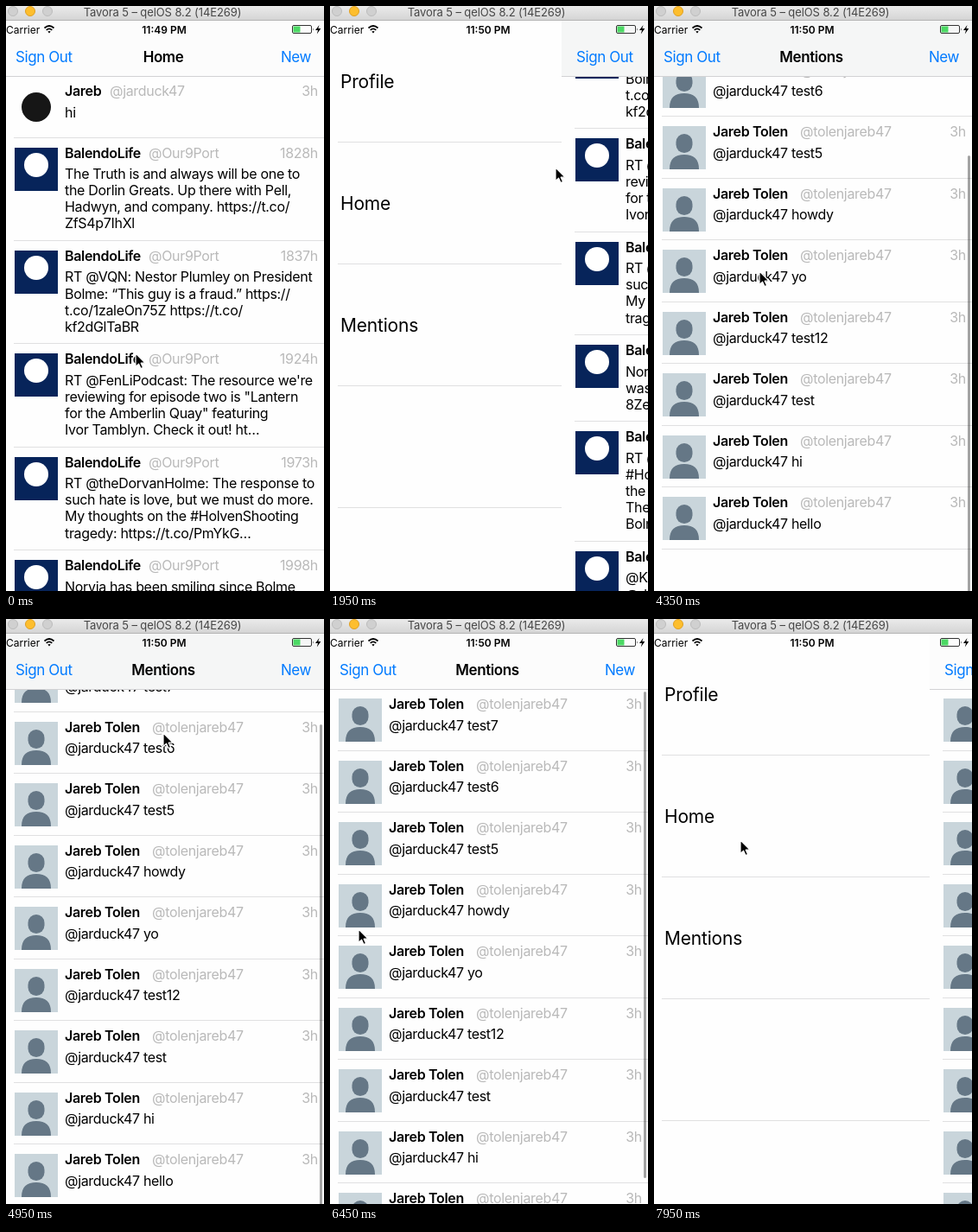
Animation, 368 px wide and 677 px high, one loop 8 s. Source, as an HTML page:

```html
<!DOCTYPE html>
<html lang="en">
<head>
<meta charset="utf-8">
<title>Timeline app</title>
<style>
html, body { margin: 0; width: 100%; height: 100%; overflow: hidden; background: #fefefe; }
svg { display: block; width: 368px; height: 677px; font-family: Inter, "Liberation Sans", sans-serif; }
text { white-space: pre; }
.body { font-size: 16px; letter-spacing: -.32px; }
.name { font-weight: 600; }
.soft { fill: #b9b9b9; }
.nav { font-size: 17px; letter-spacing: -.41px; }
.link { fill: #007aff; }
.title { font-weight: 600; }
.menu { font-size: 21px; letter-spacing: -.2px; }
.status { font-size: 12px; }
.bar { font-size: 13px; letter-spacing: -.1px; fill: #464646; }
.end { text-anchor: end; }
.mid { text-anchor: middle; }
</style>
</head>
<body>
<svg id="stage" viewBox="0 0 368 677">
  <defs>
    <linearGradient id="chrome" x2="0" y2="1">
      <stop stop-color="#ebebeb"/><stop offset="1" stop-color="#d3d3d3"/>
    </linearGradient>
    <clipPath id="face"><rect width="50" height="50"/></clipPath>
    <g id="person" clip-path="url(#face)">
      <rect width="50" height="50" fill="#c9d5db"/>
      <rect x="15.500" y="9" width="19" height="22" rx="9.500" fill="#657786"/>
      <path d="M8 50C8 38 14 33 25 33S42 38 42 50Z" fill="#657786"/>
    </g>
    <g id="club">
      <rect width="50" height="50" fill="#07245a"/>
      <circle cx="25" cy="20" r="14" fill="#fff"/>
    </g>
    <circle id="dot" cx="25" cy="25" r="17" fill="#161616"/>
  </defs>
  <rect width="368" height="677" fill="#fefefe"/>
  <g id="menu"></g>
  <g id="panel">
    <rect x="-6" y="17" width="375" height="660" fill="#fefefe"/>
    <g id="home"></g>
    <g id="mentions"></g>
    <g id="blank"></g>
    <rect id="thumb" x="363" width="3" rx="1.500"/>
    <rect id="navBack" x="-6" y="17" width="375" height="64"/>
    <rect x="-6" y="81" width="375" height="1" fill="#d2d2d4"/>
    <text id="signOut" class="nav link" y="65">Sign Out</text>
    <text id="navTitle" class="nav title mid" x="182" y="65"></text>
    <text class="nav link end" x="353" y="65">New</text>
  </g>
  <g id="status">
    <text class="status" x="0" y="31.500">Carrier</text>
    <g fill="none" stroke="#000" stroke-width="1.700">
      <path d="M44.500 25.500Q50 20.500 55.500 25.500M46.700 27.900Q50 25 53.300 27.900"/>
      <path d="M50 31.500L48.300 29.600Q50 28.300 51.700 29.600Z" fill="#000" stroke="none"/>
    </g>
    <text id="clock" class="status title mid" x="183" y="31.500"></text>
    <rect x="331.500" y="22.500" width="22" height="9" rx="1.500" fill="none" stroke="#333"/>
    <rect x="332.500" y="23.500" width="8" height="7" fill="#4cd964"/>
    <path d="M355 25.500q1.500 1.500 0 3z" fill="#333"/>
    <path d="M362.500 22L358 28h3l-1.200 4.500L364.300 26h-3z"/>
  </g>
  <g id="chromeBar">
    <rect width="368" height="17" fill="url(#chrome)"/>
    <rect y="16" width="368" height="1" fill="#b4b4b4"/>
    <g fill="#d0d0d0" stroke="#bcbcbc">
      <circle cx="8" cy="6" r="5.500"/>
      <circle cx="28" cy="6" r="5.500" fill="#fdbe2e" stroke="#dfa023"/>
      <circle cx="48" cy="6" r="5.500"/>
    </g>
    <text class="bar mid" x="181" y="12">Tavora 5 – qelOS 8.2 (14E269)</text>
  </g>
  <path id="cursor" d="M0 0V15.500L3.600 12.200L6 17.600L8.600 16.500L6.200 11.200H11Z"
    stroke="#fff" stroke-width="1.200" stroke-linejoin="round"/>
</svg>
<script>
const $ = id => document.getElementById(id);
const LOOP = 8000, STEP = 150, TOP = 81.5, OPEN = 325;

function add(parent, tag, attrs, text) {
  const el = document.createElementNS("http://www.w3.org/2000/svg", tag);
  for (const key in attrs) el.setAttribute(key, attrs[key]);
  if (text) el.textContent = text;
  parent.appendChild(el);
  return el;
}
const line = (parent, x, y) =>
  add(parent, "rect", { x, y, width: 375 - x, height: 1, fill: "#e0e0e1" });

function addRows(list, rows) {
  let top = TOP;
  for (const { icon, name, handle, handleX, age, lines } of rows) {
    const y = top + 22.5;
    add(list, "use", { href: "#" + icon, x: 10, y: Math.round(top + 10.5) });
    add(list, "text", { class: "body name", x: 68, y }, name);
    add(list, "text", { class: "body soft", x: handleX, y }, handle);
    add(list, "text", { class: "body soft end", x: 361, y }, age);
    lines.forEach((s, i) =>
      add(list, "text", { class: "body", x: 68, y: top + 47 + i * 19.1 }, s));
    top += Math.max(71.5, 43 + 19.1 * lines.length);
    line(list, 9, Math.floor(top) - 1);
  }
}

const post = (age, ...lines) => ({
  icon: "club", name: "BalendoLife", handle: "@Our9Port", handleX: 165, age, lines
});
addRows($("home"), [
  { icon: "dot", name: "Jareb", handle: "@jarduck47", handleX: 120, age: "3h", lines: ["hi"] },
  post("1828h", "The Truth is and always will be one to", "the Dorlin Greats. Up there with Pell,",
    "Hadwyn, and company. https://t.co/", "ZfS4p7IhXl"),
  post("1837h", "RT @VQN: Nestor Plumley on President", "Bolme: “This guy is a fraud.” https://",
    "t.co/1zaleOn75Z https://t.co/", "kf2dGlTaBR"),
  post("1924h", "RT @FenLiPodcast: The resource we're", "reviewing for episode two is \"Lantern",
    "for the Amberlin Quay\" featuring", "Ivor Tamblyn. Check it out! ht…"),
  post("1973h", "RT @theDorvanHolme: The response to", "such hate is love, but we must do more.",
    "My thoughts on the #HolvenShooting", "tragedy: https://t.co/PmYkG…"),
  post("1998h", "Norvia has been smiling since Bolme", "was placed into power. https://t.co/",
    "8ZehlvdbPK"),
  post("1998h", "RT @pillo38: Joss Tarvey said that the", "#HolvenCityChapelShooting justifies",
    "the #MarketBan.", "The shooter was a white supremacist,", "Bolme supp…"),
  post("2000h", "@KV31_ @CordeliaFenn @zwpolitics", "@dorwen We are not convinced,", "so far.")
]);
addRows($("mentions"), ["test7", "test6", "test5", "howdy", "yo", "test12", "test", "hi", "hello"]
  .map(word => ({
    icon: "person", name: "Jareb Tolen", handle: "@tolenjareb47", handleX: 169,
    age: "3h", lines: ["@jarduck47 " + word]
  })));
for (let y = 109; y < 677; y += 44) line($("blank"), 9, y);

const glow = add($("menu"), "rect", { y: 299, width: 368, height: 140, fill: "#d9d9d9" });
["Profile", "Home", "Mentions", ""].forEach((label, i) => {
  add($("menu"), "text", { class: "menu", x: 12, y: 95 + 141 * i }, label);
  line($("menu"), 9, 157 + 141 * i);
});

// Progress from 0 to 1 between two times, plain and eased.
const span = (t, from, to) => Math.min(1, Math.max(0, (t - from) / (to - from)));
const ease = (t, from, to) => {
  const p = span(t, from, to);
  return p * p * (3 - 2 * p);
};

const slide = t =>
  OPEN * (ease(t, 1500, 2100) - ease(t, 2850, 3780) + ease(t, 6800, 7550));

const homeScroll = t => 249 * ease(t, 0, 1050);

// Pull past the end, spring back, then pull down past the top.
const mentionScroll = t =>
  96 * ease(t, 3750, 4350) - 51 * ease(t, 4350, 4950) - 45 * ease(t, 4950, 5250)
  - 60 * Math.sin(Math.PI * span(t, 5100, 6000));

const thumbAlpha = t =>
  ease(t, 0, 150) - ease(t, 1050, 1350) + ease(t, 3600, 3750) - ease(t, 6450, 6750);

// Places where the pointer rests or turns: time, x, y.
const stops = [
  [0, 150, 402], [1200, 5, 192], [1500, 5, 192], [2100, 308, 186], [2700, 142, 349],
  [3150, 142, 349], [3750, 128, 452], [4350, 122, 307], [4650, 160, 9], [4950, 182, 132],
  [5550, 165, 345], [6450, 33, 359], [6750, 4, 356], [7500, 320, 346], [7950, 100, 256]
];
function pointer(t) {
  const last = stops[stops.length - 1];
  const i = stops.findIndex(s => s[0] > t);
  if (i < 0) return last.slice(1);
  const [from, x, y] = stops[i - 1], [to, nextX, nextY] = stops[i];
  const p = ease(t, from, to);
  return [x + (nextX - x) * p, y + (nextY - y) * p];
}

const show = (el, on) => el.setAttribute("display", on ? "inline" : "none");
const move = (el, x, y) =>
  el.setAttribute("transform", `translate(${Math.round(x)} ${Math.round(y)})`);

function drawThumb(offset, max, size, alpha) {
  const height = size - Math.max(0, -offset, offset - max);
  const y = offset > max ? 681 - height : 84 + Math.max(0, offset) / max * (597 - size);
  $("thumb").setAttribute("y", y);
  $("thumb").setAttribute("height", height);
  $("thumb").setAttribute("opacity", 0.36 * alpha);
}

function draw(time) {
  const t = Math.floor(time / STEP) * STEP;
  const atHome = t < 3000, loaded = t >= 3600, blank = !atHome && !loaded;
  const shift = slide(t);
  const offset = atHome ? homeScroll(t) : mentionScroll(t);

  move($("panel"), shift, 0);
  move($(atHome ? "home" : "mentions"), 0, -offset);
  move($("cursor"), ...pointer(t));
  show($("home"), atHome);
  show($("mentions"), !atHome && loaded);
  show($("blank"), blank);
  show(glow, blank);

  if (atHome) drawThumb(offset, 1700, 156, thumbAlpha(t));
  else drawThumb(offset, 41, 563, thumbAlpha(t));

  $("navTitle").textContent = atHome ? "Home" : "Mentions";
  $("navBack").setAttribute("fill", offset > 20 ? "#f5f6f6" : "#fcfcfc");
  // A new screen's button settles into its margin as the panel closes.
  $("signOut").setAttribute("x", blank ? 11 - 15 * shift / OPEN : 11);
  $("clock").textContent = t < 1050 ? "11:49 PM" : "11:50 PM";
}

const start = performance.now();
function tick() {
  draw((performance.now() - start) % LOOP);
  requestAnimationFrame(tick);
}
tick();
</script>
</body>
</html>
```
